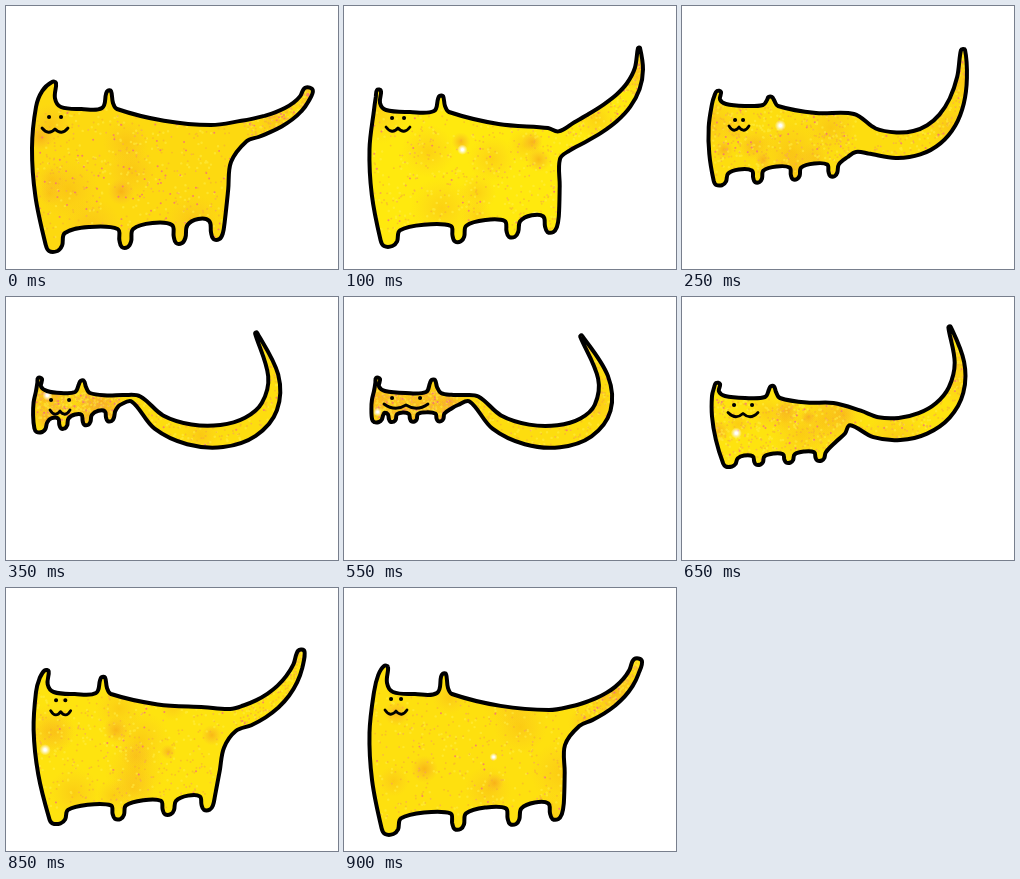
Recreate the animation shown at these times as an HTML page. Size 332 by 263 pixels, loop 950 ms.

```html
<!DOCTYPE html>
<html lang="en">
<head>
<meta charset="utf-8">
<title>Stretching cat</title>
<style>
html, body { margin: 0; width: 100%; height: 100%; overflow: hidden; background: #fff; }
svg { display: block; width: 332px; height: 263px; }
</style>
</head>
<body>
<svg viewBox="0 0 332 263">
  <defs>
    <radialGradient id="glow">
      <stop offset="0" stop-color="#f59a1a"/>
      <stop offset=".5" stop-color="#f7a52c" stop-opacity=".55"/>
      <stop offset="1" stop-color="#f9b030" stop-opacity="0"/>
    </radialGradient>
    <radialGradient id="shine">
      <stop offset=".2" stop-color="#fff"/>
      <stop offset="1" stop-color="#fff" stop-opacity="0"/>
    </radialGradient>
    <clipPath id="inside"><path id="mask"/></clipPath>
  </defs>
  <path id="skin"/>
  <g id="texture" clip-path="url(#inside)" stroke-linecap="round"></g>
  <g fill="none" stroke="#000" stroke-linecap="round" stroke-linejoin="round">
    <path id="line" stroke-width="4"/>
    <path id="mouth" stroke-width="2.8"/>
    <path id="eyes" stroke-width="4"/>
  </g>
</svg>
<script>
const LOOP = 950, STEP = 50, LEFT = 30;

// tail: Bezier centre line; taper: width at root, at tip, extra in the middle
// leg: height, width, crowding to the rear; face: x, eye y, eye gap, mouth y, mouth half width
const stand = {
  ear: [48, 76], bump: [103, 85], head: 101, rump: [205, 119], seat: [225, 156],
  tail: [[238, 125], [265, 118], [295, 108], [303, 83]], taper: [21, 8, 0],
  front: [48, 245], hind: [211, 233], leg: [22, 12, 0.47],
  face: [49, 111, 6, 122, 13], gold: 0.8, pink: 110, lift: 0
};
const reach = {
  ...stand, ear: [35, 84], bump: [97, 90], head: 104, rump: [204, 122], seat: [216, 153],
  tail: [[220, 135], [255, 115], [302, 95], [295, 42]], taper: [22, 2, 8],
  front: [45, 240], hind: [207, 226], leg: [19, 12, 0.43],
  face: [54, 112, 6, 121, 12], gold: 0.1, pink: 40
};
const crouch = {
  ...reach, ear: [37, 85], bump: [88, 91], head: 98, rump: [172, 108], seat: [174, 146],
  tail: [[190, 135], [250, 153], [284, 112], [281, 44]], taper: [26, 4, 6],
  front: [38, 179], hind: [151, 170], leg: [14, 9, 0],
  face: [57, 114, 4, 120, 10], gold: 0.6, lift: 12
};
const flat = {
  ...crouch, ear: [34, 81], bump: [76, 84], head: 94, rump: [118, 98], seat: [114, 108],
  tail: [[130, 102], [170, 168], [319, 148], [250, 36]], taper: [10, 2, 16],
  front: [34, 135], hind: [104, 124], leg: [12, 8, 0],
  face: [54, 103, 9, 113, 10], lift: 0
};
const grin = {
  ...flat, bump: [89, 83], tail: [...flat.tail.slice(0, 3), [237, 39]],
  front: [33, 125], hind: [96, 124], leg: [9, 7, -0.4],
  face: [62, 101, 14, 107, 22], lift: 12
};
const rise = {
  ...reach, ear: [38, 91], bump: [91, 96], rump: [185, 114], seat: [212, 165],
  tail: [[217, 140], [260, 134], [298, 94], [298, 45]], taper: [26, 3, 6],
  front: [62, 214], hind: [180, 203], leg: [11, 11, 0.3],
  face: [60, 115, 4, 124, 8]
};
const settle = {
  ...stand, ear: [42, 78], bump: [100, 86], head: 104, rump: [205, 122], seat: [221, 157],
  tail: [[232, 128], [262, 118], [287, 102], [294, 72]],
  front: [46, 246], hind: [212, 231], leg: [19, 12, 0.35],
  face: [52, 111, 5, 122, 11], gold: 0.5, pink: 25
};
const keys = [[0, stand], [100, reach], [250, crouch], [350, flat], [550, grin], [750, rise], [900, settle], [LOOP, stand]];

const $ = id => document.getElementById(id);
const fix = v => v.toFixed(1);
const lerp = (a, b, u) => a + (b - a) * u;
const mix = (a, b, u) => Array.isArray(a) ? a.map((v, i) => mix(v, b[i], u)) : lerp(a, b, u);

function poseAt(t) {
  const i = keys.findIndex((k, n) => t < keys[n + 1][0]);
  const [t0, a] = keys[i], [t1, b] = keys[i + 1], u = (t - t0) / (t1 - t0);
  const pose = {};
  for (const k in a) pose[k] = mix(a[k], b[k], u);
  pose.tail[3][1] -= a.lift * Math.sin(Math.PI * u);
  return pose;
}

// Point on the tail; side runs from -1 (upper edge) to 1 (lower edge).
function tailPoint({ tail, taper }, t, side) {
  const [a, b, c, d] = tail, s = 1 - t;
  const pos = k => s * s * s * a[k] + 3 * s * s * t * b[k] + 3 * s * t * t * c[k] + t * t * t * d[k];
  const vel = k => s * s * (b[k] - a[k]) + 2 * s * t * (c[k] - b[k]) + t * t * (d[k] - c[k]);
  const vx = vel(0), vy = vel(1);
  const w = lerp(taper[0], taper[1], t) + taper[2] * Math.sin(Math.PI * t);
  const k = side * w / 2 / Math.hypot(vx, vy);
  return [pos(0) - vy * k, pos(1) + vx * k];
}

function foot(pose, i) {
  const [h, w, crowd] = pose.leg, s = i / 3;
  const x = lerp(pose.front[0], pose.hind[0], s + crowd * s * (1 - s));
  return { x, y: lerp(pose.front[1], pose.hind[1], s), h, w: i ? w : w * 1.4 };
}

function outline(pose) {
  const { ear: [ex, ey], bump: [bx, by], head, rump, seat, leg } = pose;
  const base = [bx + 8, head + 2];
  const pts = [
    [LEFT, head], [lerp(LEFT, ex, 0.35), lerp(head, ey, 0.65)], [ex - 2, ey], [ex + 2, ey + 1],
    [ex + 1, lerp(head, ey, 0.35)], [ex + 7, head],
    [(ex + bx) / 2, head + 2], [bx - 7, head + 1], [bx - 3, by + 3], [bx - 1.5, by], [bx + 2, by],
    [bx + 4, head - 4], base,
    [(base[0] + rump[0]) / 2, (base[1] + rump[1]) / 2 + 0.04 * (rump[0] - base[0])], rump
  ];
  const n = 7;
  for (let i = 0; i <= n; i++) pts.push(tailPoint(pose, i / n, -1));
  for (let i = n; i >= 0; i--) pts.push(tailPoint(pose, i / n, 1));
  pts.push(seat);
  const last = foot(pose, 3);
  pts.push([(seat[0] + last.x + leg[1] * 0.7) / 2, (seat[1] + last.y - last.h) / 2]);
  for (let i = 3; i >= 0; i--) {
    const { x, y, h, w } = foot(pose, i);
    pts.push([x + w * 0.65, y - h * 0.82], [x + w * 0.48, y - h * 0.25], [x + w * 0.2, y],
      [x - w * 0.3, y], [x - w * 0.5, y - h * 0.3]);
    if (i) {
      const next = foot(pose, i - 1);
      pts.push([x - w * 0.65, y - h * 0.82], [(x + next.x) / 2, (y + next.y) / 2 - h]);
    }
  }
  const [cx, cy] = pts[pts.length - 1];
  for (const u of [0.35, 0.7]) pts.push([lerp(cx, LEFT, u) - 0.05 * (cy - head), lerp(cy, head, u)]);
  return curve(pts);
}

// Closed smooth curve whose handles shrink at sharp turns.
function curve(pts) {
  const n = pts.length, get = i => pts[(i + n) % n];
  const handle = (i, sign, seg) => {
    const [ax, ay] = get(i - 1), [bx, by] = get(i + 1), [x, y] = get(i);
    const d = Math.hypot(bx - ax, by - ay) || 1;
    const k = sign * Math.min(0.34 * seg, d / 4) / d;
    return fix(x + (bx - ax) * k) + " " + fix(y + (by - ay) * k);
  };
  let d = "M" + pts[0].map(fix).join(" ");
  for (let i = 0; i < n; i++) {
    const a = get(i), b = get(i + 1), seg = Math.hypot(b[0] - a[0], b[1] - a[1]);
    d += `C${handle(i, 1, seg)} ${handle(i + 1, -1, seg)} ${b.map(fix).join(" ")}`;
  }
  return d + "Z";
}

function random(seed) {
  let s = seed * 7919 + 17;
  return () => {
    s = (s + 0x6d2b79f5) | 0;
    let t = Math.imul(s ^ (s >>> 15), 1 | s);
    t = (t + Math.imul(t ^ (t >>> 7), 61 | t)) ^ t;
    return ((t ^ (t >>> 14)) >>> 0) / 4294967296;
  };
}

function texture(step, pose) {
  const rnd = random(step + 1);
  const inBody = () => [lerp(LEFT, pose.seat[0], rnd()), lerp(pose.head, pose.hind[1], rnd())];
  const anywhere = () => rnd() < 0.75 ? inBody() : tailPoint(pose, rnd(), rnd() * 2 - 1);
  const dots = (color, count, size, alpha) => {
    let d = "";
    for (let i = 0; i < count; i++) d += `M${anywhere().map(fix).join(" ")}h.1`;
    return `<path d="${d}" stroke="${color}" stroke-width="${size}" opacity="${alpha}"/>`;
  };
  const spots = (kind, count, min, max, alpha, place) => {
    let out = "";
    for (let i = 0; i < count; i++) {
      const [x, y] = place();
      out += `<circle cx="${fix(x)}" cy="${fix(y)}" r="${fix(lerp(min, max, rnd()))}" fill="url(#${kind})" opacity="${alpha}"/>`;
    }
    return out;
  };
  return spots("glow", 10, 12, 34, 0.3, anywhere) + spots("glow", 3, 7, 14, 0.6, inBody) +
    dots("#fff04a", 260, 2.4, 0.5) + dots("#f5a83a", 300, 1.8, 0.55) +
    dots("#f4608c", pose.pink, 1.9, 0.7) + dots("#f79a6a", 90, 1.7, 0.6) +
    spots("shine", Math.round(2 * (1 - pose.gold)), 4, 6, 1, inBody);
}

function draw(step) {
  const pose = poseAt(step * STEP), d = outline(pose);
  for (const id of ["skin", "mask", "line"]) $(id).setAttribute("d", d);
  $("skin").setAttribute("fill", `rgb(${mix([255, 235, 14], [252, 212, 16], pose.gold).map(Math.round)})`);
  $("texture").innerHTML = texture(step, pose);
  const [x, eyeY, gap, y, m] = pose.face;
  $("eyes").setAttribute("d", [x - gap, x + gap].map(ex => `M${fix(ex)} ${fix(eyeY)}h.1`).join(""));
  $("mouth").setAttribute("d", `M${x - m} ${y}Q${x - m / 2} ${y + 8} ${x} ${y + 1}Q${x + m / 2} ${y + 8} ${x + m} ${y}`);
}

let start = null, shown = -1;
function tick(now) {
  if (start === null) start = now;
  const step = Math.floor(((now - start) % LOOP) / STEP);
  if (step !== shown) draw(shown = step);
  requestAnimationFrame(tick);
}
draw(0);
requestAnimationFrame(tick);
</script>
</body>
</html>
```
